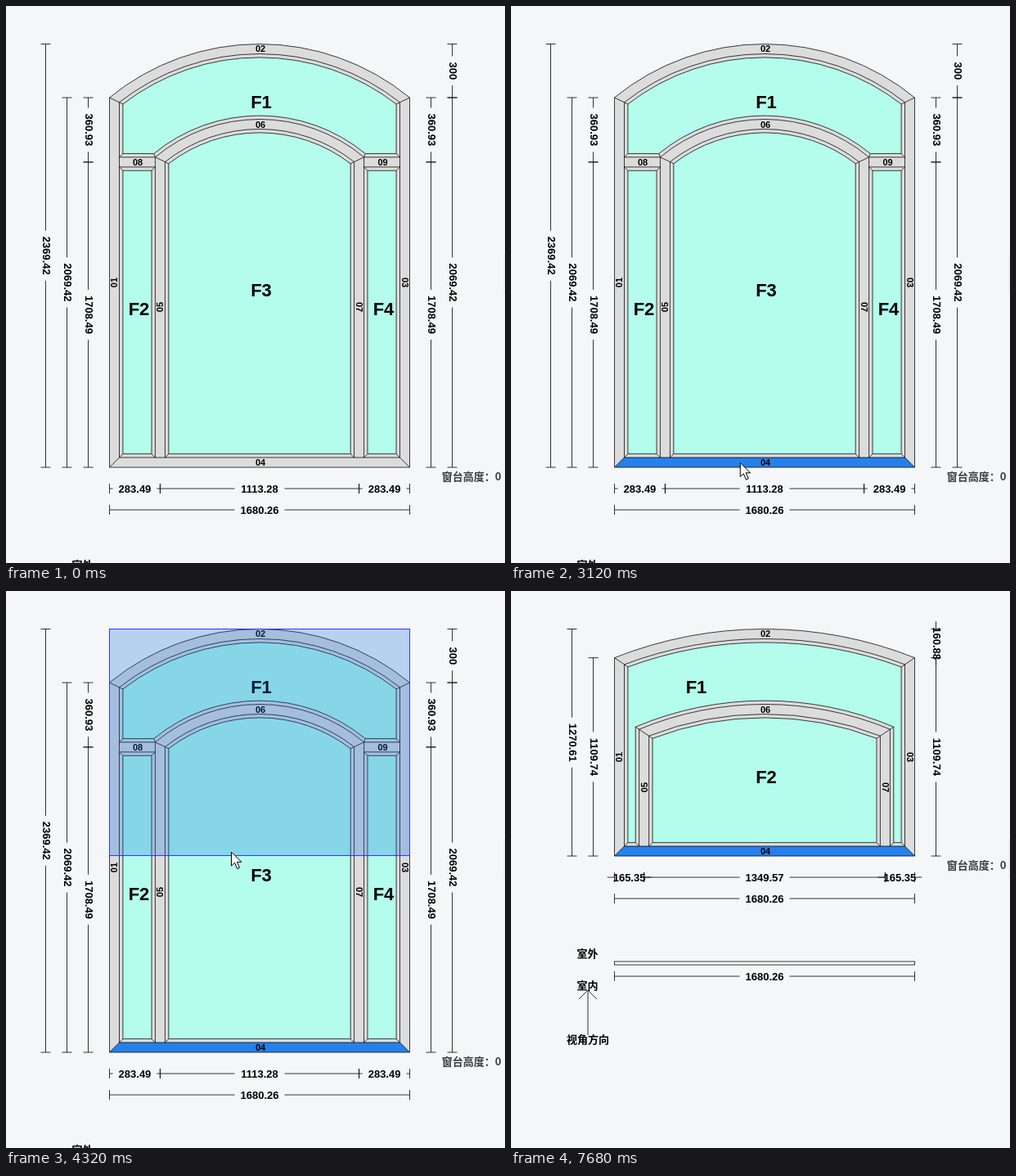
An HTML page for the animation above (8280 ms loop, 610 px wide and 681 px high).

```html
<!DOCTYPE html>
<html lang="zh">
<head>
<meta charset="utf-8">
<title>Arched window</title>
<style>
  html, body { margin: 0; width: 100%; height: 100%; overflow: hidden; background: #f4f6f8; }
  svg { display: block; }
  text { font: bold 13px "Liberation Sans", Arial, sans-serif; text-anchor: middle; }
  .pane { font-size: 22px; }
  .part { font-size: 11px; }
  .cjk { font-family: "Noto Sans CJK SC", "Noto Sans CJK", sans-serif; }
  .bar { fill: #dcdcdc; }
  .glass { fill: #b4fcec; stroke: #000; stroke-width: .75; }
  .line { fill: none; stroke: #000; stroke-width: .75; }
  .dim { fill: none; stroke: #000; stroke-width: .8; }
</style>
</head>
<body>
<svg id="stage" width="610" height="681" viewBox="0 0 610 681"></svg>
<script>
const LOOP = 8280, STEP = 60;
const LEFT = 126.5, RIGHT = 493.5, TOP = 46.5, MID = 310;
const SCALE = (RIGHT - LEFT) / 1680.26; // pixels per millimetre
const BAR = 12, BEAD = 4.4, HOOD = 138.5;
const mirror = x => 2 * MID - x;

// Arc through an apex, centred on the window axis
const arc = (apex, r) => ({
  r,
  y: x => apex + r - Math.sqrt(r * r - (x - MID) ** 2),
  x: y => MID - Math.sqrt(r * r - (apex + r - y) ** 2)
});
const inset = (apex, r, d) => arc(apex + d, r - d);
const radius = (half, rise) => (half * half + rise * rise) / (2 * rise);

// Points are [x, y] or [x, y, r]; r draws an arc to the point, negative for counter-clockwise
const shape = pts => pts.map(([x, y, r], i) =>
  i === 0 ? `M${x} ${y}` : r ? `A${Math.abs(r)} ${Math.abs(r)} 0 0 ${r > 0 ? 1 : 0} ${x} ${y}` : `L${x} ${y}`
).join('') + 'Z';

const path = (cls, d) => `<path class="${cls}" d="${d}"/>`;

const label = (x, y, s, cls = '', turn = 0, drop = 4.5) =>
  `<text class="${cls}" transform="translate(${x} ${y}) rotate(${turn})" y="${drop}">${s}</text>`;
const paneLabel = (x, y, s) => label(x, y, s, 'pane', 0, 7.6);
const partLabel = (x, y, s, turn) => label(x, y, s, 'part', turn, 4);
const cjk = (x, y, s) => label(x, y, s, 'cjk');

const mitres = (outer, inner) =>
  path('line', outer.map(([x, y], i) => `M${x} ${y}L${inner[i][0]} ${inner[i][1]}`).join(''));

// Glass with its bead
const pane = (outer, inner) =>
  path('bar line', shape(outer)).replace('bar line', 'line') +
  path('glass', shape(inner)) + mitres(outer, inner);

const arch = (x, bottom, a) =>
  [[x, bottom], [x, a.y(x)], [mirror(x), a.y(x), a.r], [mirror(x), bottom]];

function dim(vertical, at, a, b, s) {
  const c = (a + b) / 2;
  const gap = 13 * (0.556 * s.length - (s.includes('.') ? 0.278 : 0)) / 2 + 7;
  const run = (p, q) => vertical ? `M${at} ${p}V${q}` : `M${p} ${at}H${q}`;
  const tick = p => vertical ? `M${at - 6} ${p}h12` : `M${p} ${at - 6}v12`;
  return path('dim', run(a, c - gap) + run(c + gap, b) + tick(a) + tick(b)) +
    (vertical ? label(at + 1, c, s, '', 90) : label(c, at, s));
}
const vdim = (...a) => dim(true, ...a);
const hdim = (...a) => dim(false, ...a);

// Outer frame with its sill; the panes draw the inner edge
function frame(bottom, r) {
  const outer = arch(LEFT, bottom, arc(TOP, r));
  const inner = arch(LEFT + BAR, bottom - BAR, inset(TOP, r, BAR));
  const sill = [outer[0], inner[0], inner[3], outer[3]].map(([x, y]) => [x, y]);
  return path('bar', shape(outer)) + path('bar sill', shape(sill)) +
    path('line', shape(outer)) + mitres(outer, inner);
}

// Everything placed relative to the bottom edge
function below(b, post, side, centre) {
  return hdim(b + 26, LEFT, post, side) + hdim(b + 26, post, mirror(post), centre) +
    hdim(b + 26, mirror(post), RIGHT, side) + hdim(b + 52, LEFT, RIGHT, '1680.26') +
    `<g fill="#3c3c3c">${cjk(569, b + 11, '窗台高度：0')}</g>` +
    cjk(93.5, b + 119.5, '室外') + cjk(93.5, b + 158.5, '室内') + cjk(94, b + 224.5, '视角方向') +
    `<rect class="dim" x="${LEFT}" y="${b + 129}" width="367" height="4" style="fill:#fff"/>` +
    hdim(b + 147, LEFT, RIGHT, '1680.26') +
    path('dim', `M94 ${b + 219}V${b + 164}M83 ${b + 175}L94 ${b + 164}L105 ${b + 175}`);
}

// Shared measures of a window, sizes in millimetres
function measure(height, rise, split, hoodRadius) {
  const b = TOP + height * SCALE, spring = TOP + rise * SCALE, post = LEFT + split * SCALE;
  const r = radius((RIGHT - LEFT) / 2, rise * SCALE);
  return {
    b, spring, post, r,
    low: b - BAR, base: b - BAR - BEAD,
    x: LEFT + BAR, gx: LEFT + BAR + BEAD,
    p1: post - BAR / 2, p2: post + BAR / 2,
    open: inset(TOP, r, BAR), lite: inset(TOP, r, BAR + BEAD),
    bar: arc(HOOD, hoodRadius), bead: inset(HOOD, hoodRadius, -BEAD),
    barIn: inset(HOOD, hoodRadius, BAR), beadIn: inset(HOOD, hoodRadius, BAR + BEAD)
  };
}

const innerPane = m => pane(arch(m.p2, m.low, m.barIn), arch(m.p2 + BEAD, m.base, m.beadIn));

// Joint of hood and posts, and the feet of the posts
const posts = m => path('line',
  `M${m.p1} ${m.bar.y(m.p1)}L${m.p2} ${m.barIn.y(m.p2)}` +
  `M${mirror(m.p1)} ${m.bar.y(m.p1)}L${mirror(m.p2)} ${m.barIn.y(m.p2)}` +
  `M${m.p1} ${m.low}H${m.p2}M${mirror(m.p2)} ${m.low}H${mirror(m.p1)}`);

function tallWindow() {
  const m = measure(2369.42, 300, 283.49, 198.8);
  const { b, spring } = m;
  const rail = spring + 360.93 * SCALE, r1 = rail - BAR / 2, r2 = rail + BAR / 2;
  const top = (a, x, y, low) => {
    const end = low.x(y);
    return [[x, y], [x, a.y(x)], [mirror(x), a.y(x), a.r], [mirror(x), y], [mirror(end), y], [end, y, -low.r]];
  };
  const box = (x1, y1, x2, y2) => [[x1, y1], [x2, y1], [x2, y2], [x1, y2]];
  const flip = pts => pts.map(([x, y]) => [mirror(x), y]);
  const out = box(m.x, r2, m.p1, m.low), inn = box(m.gx, r2 + BEAD, m.p1 - BEAD, m.base);
  const railEnds = [m.x, m.p1, mirror(m.p1), mirror(m.x)].map(x => `M${x} ${r1}V${r2}`).join('');
  return frame(b, m.r) +
    pane(top(m.open, m.x, r1, m.bar), top(m.lite, m.gx, r1 - BEAD, m.bead)) +
    pane(out, inn) + pane(flip(out), flip(inn)) +
    innerPane(m) + posts(m) + path('line', railEnds) +
    paneLabel(312, 117.5, 'F1') + paneLabel(162.5, 370.5, 'F2') +
    paneLabel(312, 347, 'F3') + paneLabel(461.5, 370.5, 'F4') +
    partLabel(311, 52, '02') + partLabel(311, 144.5, '06') + partLabel(311, 558, '04') +
    partLabel(161, 190.5, '08') + partLabel(460.5, 190.5, '09') +
    partLabel(131.5, 338, '01', -90) + partLabel(487.5, 338, '03', 90) +
    partLabel(187.5, 368, '05', -90) + partLabel(431.5, 368, '07', 90) +
    vdim(LEFT - 78, TOP, b, '2369.42') + vdim(LEFT - 52, spring, b, '2069.42') +
    [LEFT - 26, RIGHT + 26].map(x => vdim(x, spring, rail, '360.93') + vdim(x, rail, b, '1708.49')).join('') +
    vdim(RIGHT + 52, TOP, spring, '300') + vdim(RIGHT + 52, spring, b, '2069.42') +
    below(b, m.post, '283.49', '1113.28');
}

function shortWindow() {
  const m = measure(1270.61, 160.88, 165.35, 399.6);
  const { b, spring } = m;
  const around = (a, x, y, low, x2) => [...arch(x, y, a),
    [mirror(x2), y], [mirror(x2), low.y(x2)], [x2, low.y(x2), -low.r], [x2, y]];
  return frame(b, m.r) +
    pane(around(m.open, m.x, m.low, m.bar, m.p1), around(m.lite, m.gx, m.base, m.bead, m.p1 - BEAD)) +
    innerPane(m) + posts(m) +
    paneLabel(226.5, 117.5, 'F1') + paneLabel(312, 227, 'F2') +
    partLabel(311, 52, '02') + partLabel(311, 144.5, '06') + partLabel(311, 318, '04') +
    partLabel(131.5, 203, '01', -90) + partLabel(487.5, 203, '03', 90) +
    partLabel(162.5, 240, '05', -90) + partLabel(457.5, 240, '07', 90) +
    vdim(LEFT - 52, TOP, b, '1270.61') + vdim(LEFT - 26, spring, b, '1109.74') +
    vdim(RIGHT + 26, TOP, spring, '160.88') + vdim(RIGHT + 26, spring, b, '1109.74') +
    below(b, m.post, '165.35', '1349.57');
}

// Moves: [first step, last step, x, y, eased]
const pointerMoves = [
  [60, 60, 588, 127],
  [120, 360, 298.5, 531.5],
  [540, 840, 300.5, 557.5],
  [1440, 1560, 278.5, 565],
  [2460, 2460, 279.5, 556],
  [2520, 2520, 280, 558],
  [3120, 3180, 280.5, 559],
  [3480, 3780, 269.5, 285.5, 1],
  [3840, 3960, 269, 276],
  [4020, 4200, 275, 317.5],
  [4320, 4320, 275.5, 319],
  [5640, 6000, 425, 435],
  [6060, 6420, 559, 346],
  [6480, 6600, 571.5, 301.5],
  [6780, 6840, 573.5, 289.5],
  [7560, 7620, 586, 260]
];
const edgeMoves = [
  [0, 0, 0, 563.5],
  [3480, 3780, 0, 296, 1],
  [3840, 3960, 0, 281],
  [4020, 4200, 0, 322],
  [4320, 4320, 0, 323.5]
];

function follow(moves, t) {
  let x = moves[0][2], y = moves[0][3];
  for (const [from, to, nx, ny, eased] of moves) {
    if (t < from) break;
    let p = Math.min(1, (t - from + STEP) / (to - from + STEP));
    if (eased) p = p * p * (3 - 2 * p);
    x += (nx - x) * p;
    y += (ny - y) * p;
  }
  return [x, y];
}

const stage = document.getElementById('stage');
stage.innerHTML =
  `<rect width="610" height="681" fill="#f4f6f8"/>
  <rect x="608.5" y="302" width="6" height="50" rx="2" fill="#eaecef"/>
  <g id="tall">${tallWindow()}</g>
  <g id="short">${shortWindow()}</g>
  <rect id="drag" x="${LEFT}" y="${TOP}" width="367" fill="#0064dc" fill-opacity=".25" stroke="#33f"/>
  <path id="pointer" d="M0 0V17L4 13.3L7.2 20.6L10 19.4L6.9 12.3H12.3Z" fill="#fff" stroke="#000"/>`;

const el = id => document.getElementById(id);
const [tall, short, drag, pointer] = ['tall', 'short', 'drag', 'pointer'].map(el);
const sills = stage.querySelectorAll('.sill');
const show = (node, on) => node.setAttribute('display', on ? 'inline' : 'none');
const within = (t, a, b) => t >= a && t < b;

function draw(ms) {
  const t = Math.floor((ms % LOOP) / STEP) * STEP;
  const picked = within(t, 1140, 1980) || t >= 2820;
  show(tall, t < 4680);
  show(short, t >= 4680);
  sills.forEach(s => { s.style.fill = picked ? '#2680eb' : '#dcdcdc'; });

  show(drag, within(t, 1140, 1440) || within(t, 2820, 3120) || within(t, 3420, 4680));
  drag.setAttribute('height', follow(edgeMoves, t)[1] - TOP);

  const [x, y] = follow(pointerMoves, t);
  show(pointer, within(t, 60, 7680));
  pointer.setAttribute('transform', `translate(${x} ${y})`);
}

const start = performance.now();
function tick() {
  draw(performance.now() - start);
  requestAnimationFrame(tick);
}
draw(0);
requestAnimationFrame(tick);
</script>
</body>
</html>
```
